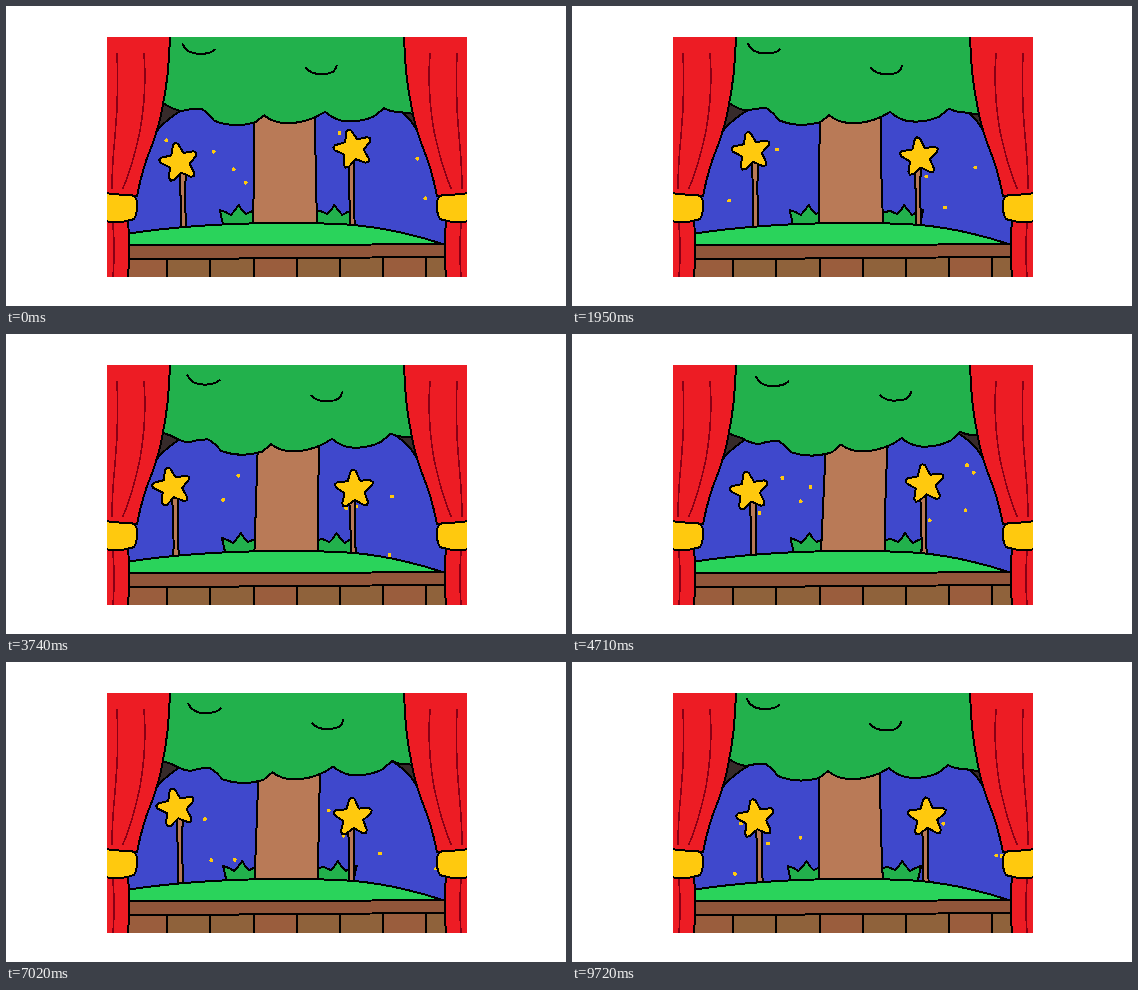
An HTML page that plays this animation: 560 px wide and 300 px high, repeating every 9.82 s.

```html
<!DOCTYPE html>
<html lang="en">
<head>
<meta charset="utf-8">
<title>Starry stage</title>
<style>
html, body { margin: 0; width: 100%; height: 100%; overflow: hidden; background: #fff; }
svg { display: block; width: 560px; height: 300px; }
.ink { stroke: #000; stroke-width: 2; stroke-linejoin: round; stroke-linecap: round; }
.fold { fill: none; stroke: #880015; stroke-width: 1.6; stroke-linecap: round; }
</style>
</head>
<body>
<svg viewBox="0 0 560 300" shape-rendering="crispEdges">
  <defs>
    <clipPath id="stage"><rect x="101" y="31" width="360" height="240"/></clipPath>
    <g id="curtain">
      <path class="ink" fill="#ed1c24" d="M99 213H122Q124 240 122 273H99Z"/>
      <path class="ink" fill="#ed1c24" d="M99 29H164Q163 70 157 98Q154 118 145 142Q137 160 131 190H99Z"/>
      <path class="fold" d="M111 48Q113 90 109 130Q106 160 106 182M138 48Q141 85 134 125Q126 162 117 182M107 218Q109 245 107 271"/>
      <path class="ink" fill="#ffc90e" d="M99 187Q113 189 125 189Q130 190 131 196Q132 206 128 213Q115 218 99 215Z"/>
    </g>
    <path id="bush" class="ink" fill="#22b14c" d="M217 222L213 204Q220 206 224 209Q228 205 232 199Q235 205 239 208L246 205L262 208V222Z"/>
  </defs>
  <g clip-path="url(#stage)">
    <rect x="101" y="31" width="360" height="240" fill="#362a2a"/>
    <path class="ink" fill="#3f48cc" d="M118 242V175L150 126Q160 113 178 103L280 90L384 98Q402 108 411 124L444 180V242Z"/>
    <g id="sparks" fill="#ffc90e"></g>
    <g id="bushes"><use href="#bush"/><use href="#bush" transform="translate(559.5 0) scale(-1 1)"/></g>
    <path id="trunk" class="ink" fill="#b97a57"/>
    <g id="wands"></g>
    <g id="canopy">
      <path class="ink" fill="#22b14c" d="M110 10V78L135 88L157 97Q166 103 174 104Q184 101 194 102Q201 107 206 114Q226 122 247 116L256 109Q264 116 276 117Q292 118 308 111L317 106Q323 112 333 115Q350 118 366 111L376 103Q383 107 392 107Q402 109 410 109L450 112V10Z"/>
      <path class="ink" fill="none" d="M175 37Q179 47 193 47Q203 47 207 43M298 62Q304 69 315 68Q327 69 329 60"/>
    </g>
    <path class="ink" fill="#2ad35b" d="M120 228Q190 217 280 217Q322 217 348 219Q392 223 440 239H120Z"/>
    <g id="planks"></g>
    <path class="ink" fill="#91563a" d="M120 239H290L442 238V251L290 252L120 253.5Z"/>
    <use href="#curtain"/>
    <use href="#curtain" transform="translate(562 0) scale(-1 1)"/>
  </g>
</svg>
<script>
const LOOP = 9820, LAST = 9720, TAU = Math.PI * 2;
const $ = id => document.getElementById(id);
const wave = (t, period, peak) => Math.cos(TAU * (t - peak) / period);

function add(parent, tag, attrs) {
  const el = document.createElementNS('http://www.w3.org/2000/svg', tag);
  for (const k in attrs) el.setAttribute(k, attrs[k]);
  return parent.appendChild(el);
}

// Repeatable random number in 0..1
function rand(seed) {
  const v = Math.sin(seed * 12.9898 + 4.1) * 43758.5453;
  return v - Math.floor(v);
}

for (let i = 0; i < 8; i++) {
  add($('planks'), 'rect', {
    class: 'ink', x: 118 + 43.2 * i, y: 250, width: 43.2, height: 24,
    fill: i % 3 ? '#8f623b' : '#9a5d3d'
  });
}

function starPath() {
  const pts = [];
  const put = (deg, r) => {
    const a = deg * TAU / 360;
    pts.push((Math.sin(a) * r).toFixed(1) + ' ' + (-Math.cos(a) * r).toFixed(1));
  };
  for (let a = 0; a < 360; a += 72) {
    put(a - 8, 18.5);
    put(a, 20);
    put(a + 8, 18.5);
    put(a + 36, 10.5);
  }
  return 'M' + pts.join('L') + 'Z';
}

const wands = [0, 1].map(() => ({
  stick: add($('wands'), 'path', { class: 'ink', fill: '#b97a57' }),
  star: add($('wands'), 'path', { class: 'ink', fill: '#ffc90e', d: starPath() })
}));

function drawWand(w, x, y, turn, lean) {
  const top = x + lean - 1, foot = x + lean, mid = y + 38;
  w.stick.setAttribute('d',
    `M${top - 3} ${y + 8}Q${top - 1} ${mid} ${foot - 2.5} 226H${foot + 3}Q${top + 2} ${mid} ${top + 3.5} ${y + 8}Z`);
  w.star.setAttribute('transform', `translate(${x} ${y}) rotate(${turn})`);
}

const sparks = Array.from({ length: 8 }, () => add($('sparks'), 'circle', { r: 2 }));

// Each spark drifts down for one life, then starts again elsewhere
function drawSpark(el, i, t) {
  const life = 1500 + 900 * rand(i + 1);
  const turns = t / life + rand(i + 50);
  const seed = i * 31 + Math.floor(turns) * 7;
  const age = turns % 1;
  const [left, width] = i % 2 ? [150, 95] : [318, 115];
  el.setAttribute('cx', left + width * rand(seed + 3) + 14 * age);
  el.setAttribute('cy', 120 + 85 * rand(seed + 5) + 26 * age);
}

function draw(t) {
  const sway = 1 - wave(t, 8800, 1120);
  $('canopy').setAttribute('transform', `rotate(${-1.72 * sway} 290 -126)`);
  $('trunk').setAttribute('d',
    `M${247 + 4 * sway} 100Q${247 + 2.5 * sway} 165 ${247 + sway} 222H${311 + sway}` +
    `Q${308 + 2.5 * sway} 160 ${308 + 4.5 * sway} 100Z`);
  $('bushes').setAttribute('transform', `translate(${3.2 - 2.4 * wave(t, 3030, 0)} 0)`);

  const side = wave(t, 4400, 1200);
  drawWand(wands[0], 174.5 + 10 * side, 151.3 + 6 * wave(t, 5250, -446), 2 * side - 11, 4.3);
  const bob = -wave(t, 2690, 0);
  drawWand(wands[1], 351.5 + 4.5 * wave(t, 1720, 946), 150 + 7 * bob, 6 * bob - 8, -1.2);

  sparks.forEach((el, i) => drawSpark(el, i, t));
}

const start = performance.now();
function tick() {
  draw(Math.min((performance.now() - start) % LOOP, LAST));
  requestAnimationFrame(tick);
}
tick();
</script>
</body>
</html>
```
